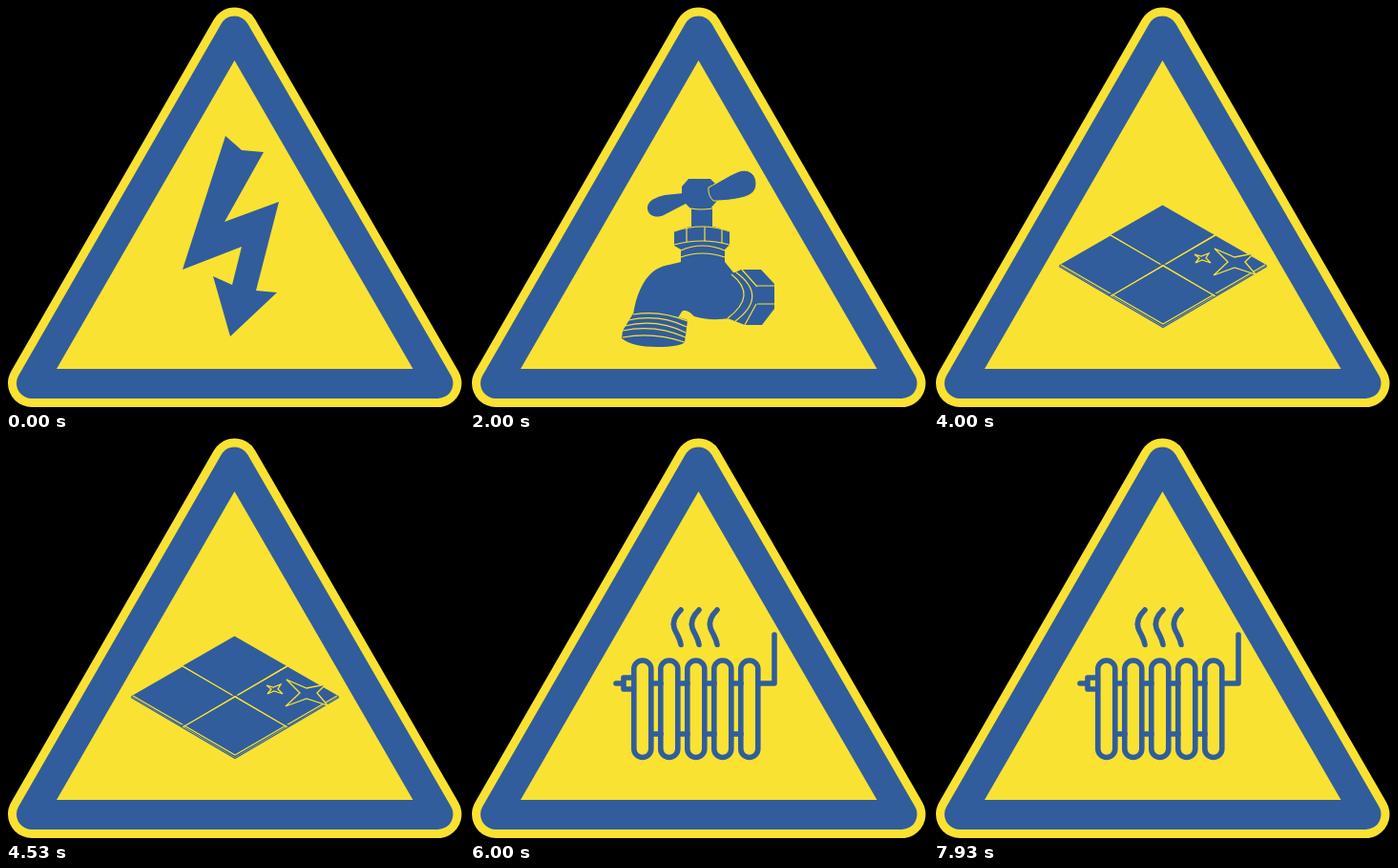
An HTML page without scripts for the animation above (8000 ms loop, 480 by 422 pixels).

```html
<!DOCTYPE html>
<html lang="en">
<head>
<meta charset="utf-8">
<title>Household warning signs</title>
<style>
  :root { --blue: #315d9c; --yellow: #fae232; }
  html, body { margin: 0; width: 100%; height: 100%; overflow: hidden; background: #000; }
  svg { display: block; width: 100%; height: 100%; }
  .blue { fill: var(--blue); }
  .yellow { fill: var(--yellow); }
  .rim { fill: var(--yellow); stroke: var(--yellow); stroke-width: 50; stroke-linejoin: round; }
  .band { fill: var(--blue); stroke: var(--blue); stroke-width: 32; stroke-linejoin: round; }
  .seam { fill: none; stroke: var(--yellow); stroke-width: 1.2; }
  .edge { fill: none; stroke: var(--blue); stroke-width: 1.2; }
  .star { fill: var(--blue); stroke: var(--yellow); stroke-width: 1.3; }
  .pipe { fill: none; stroke: var(--blue); stroke-width: 5.6; stroke-linecap: round; stroke-linejoin: round; }
  .icon { visibility: hidden; animation: turn 8s step-end infinite; }
  .tap { animation-delay: -6s; }
  .floor { animation-delay: -4s; }
  .heat { animation-delay: -2s; }
  @keyframes turn { 0% { visibility: visible; } 25%, 100% { visibility: hidden; } }
</style>
</head>
<body>
<svg viewBox="0 0 480 422">
  <defs>
    <path id="sign" d="M239.5 26.5 452.5 395H27Z"/>
    <path id="tile" d="M0 0 54 31 0 63-54 31Z"/>
    <rect id="column" x="171.8" y="234" width="18" height="101.500" rx="9"/>
    <path id="steam" d="M221 181C214 188 212 194 214 200S220 210 221 217.500"/>
  </defs>

  <use href="#sign" class="rim"/>
  <use href="#sign" class="band"/>
  <path class="yellow" d="M239.5 57 426.500 380H53Z"/>

  <g class="icon bolt">
    <path class="blue" d="M230 136 247 151 270 153 229 226 286 205 262 298 284 300 235 346 217 283 237 292 247 252 185 276Z"/>
  </g>

  <g class="icon tap">
    <g class="blue">
      <!-- handle -->
      <path d="M224 196 204 198C191 201 185 206 186 213 188 221 196 222 203 219L226 207Z"/>
      <path d="M229 181H252L259 188V204L252 212H231L222 203V189Z"/>
      <path d="M232 211H254V231H232Z"/>
      <!-- collar and body -->
      <path d="M214 236Q243 224 272 236V250L267 255V268L276 279H292V327H273Q250 330 235 325 226 316 222 320L217 328 171 323C174 303 181 287 192 278 201 271 211 271 221 268V255L214 251Z"/>
      <!-- wall nut -->
      <path d="M274 281 284 276H305L319 291V317L306 334H288L270 327Q289 302 274 281Z"/>
      <!-- spout -->
      <path d="M171 322Q197 317 228 329L225 352Q220 357 196 357 170 357 159 348L160 340Z"/>
    </g>
    <path class="blue" stroke="var(--yellow)" d="M250 190C262 184 275 175 284 172.500 293 170.500 300 177 300 186S293 199 284 201 267 204 255 204Q249 198 250 190Z"/>
    <g class="seam">
      <path d="M231 212Q243 214 254 212M214 236Q243 226 272 236M214 250Q243 242 272 250M227 232V247M246 231V246M264 233V248M221 256Q243 246 267 256M221 263Q243 255 267 263"/>
      <path d="M274 281Q302 303 270 327M279 279Q313 304 278 330M285 276 301 294M301 293H319M301 312H319M288 334 300 312"/>
      <path d="M171 323Q199 318 228 330M166 329Q198 322 227 336M162 335Q196 327 226 342M160 340Q194 333 226 347M160 347Q192 341 225 352"/>
    </g>
  </g>

  <g class="icon floor">
    <g class="blue">
      <use href="#tile" x="239.5" y="208.500"/>
      <use href="#tile" x="185" y="240.500"/>
      <use href="#tile" x="295" y="240.500"/>
      <use href="#tile" x="240" y="272.500"/>
    </g>
    <path class="seam" d="M185 240 295 304M295 240 185 304M133 271 240 333 347 271"/>
    <path class="edge" d="M187 239 297 303M293 239 183 303M131 272.500 240 336.500 349 272.500"/>
    <path class="star" d="M273 260 280 262 288 259 285 264 290 269 281 266 274 269 278 264Z"/>
    <path class="star" d="M294 254 315 263 335 259 326 268 337 281 315 274 293 282 308 268Z"/>
  </g>

  <g class="icon heat">
    <g class="pipe">
      <use href="#steam"/>
      <use href="#steam" x="19"/>
      <use href="#steam" x="38"/>
      <use href="#column"/>
      <use href="#column" x="28"/>
      <use href="#column" x="56"/>
      <use href="#column" x="84"/>
      <use href="#column" x="112"/>
      <path d="M153 258H160M171 252H161V264H171M303 258H319V207"/>
      <path d="M190 258H200M218 258H228M246 258H256M274 258H284"/>
      <path d="M190 311H200M218 311H228M246 311H256M274 311H284"/>
    </g>
  </g>
</svg>
</body>
</html>
```
